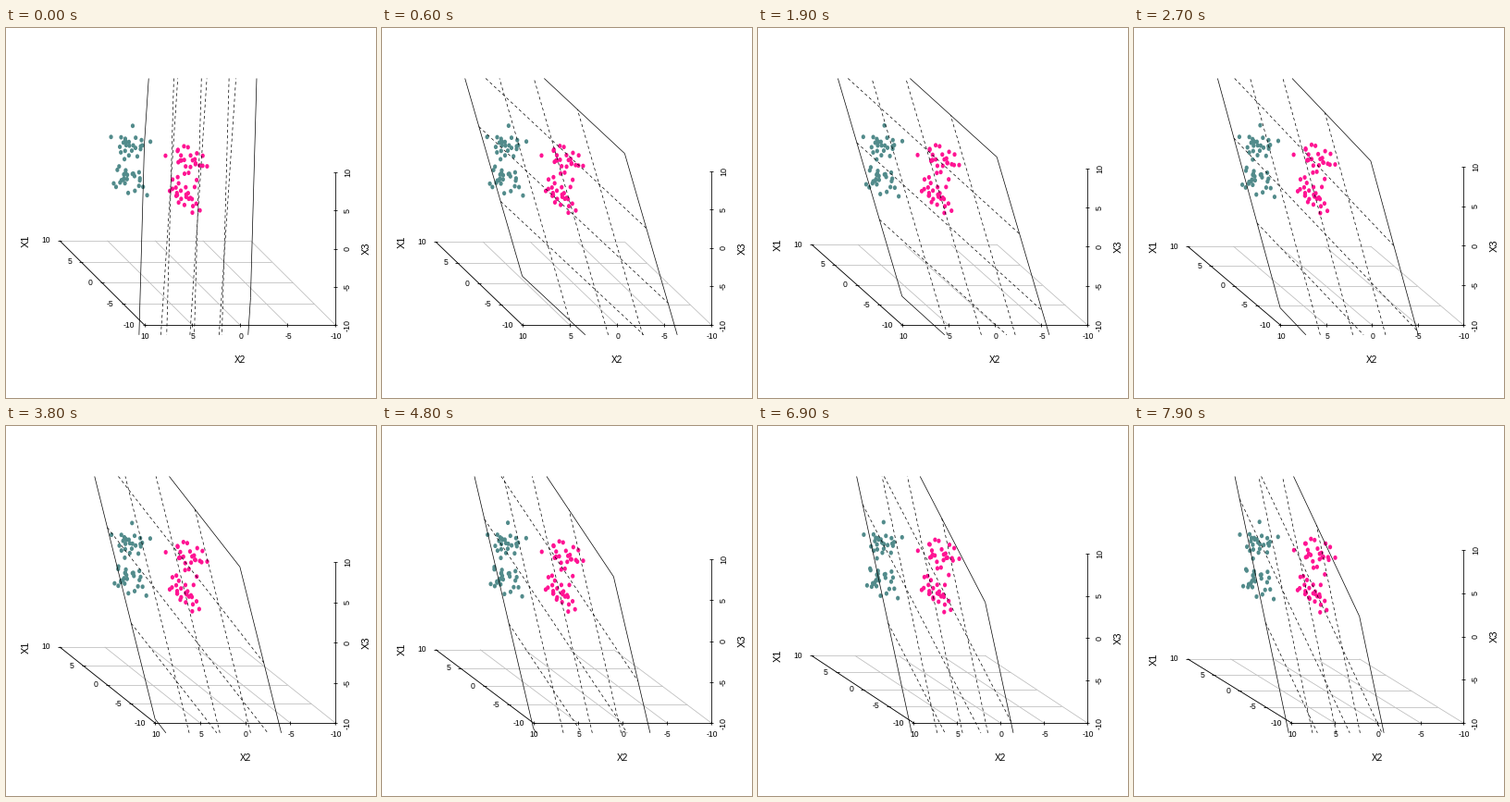
A matplotlib script that plays this animation: 400x400 px, repeating every 8 s.

```python
import numpy as np
import matplotlib.pyplot as plt
from matplotlib.animation import FuncAnimation
from matplotlib.collections import EllipseCollection, LineCollection

FRAMES, STEP = 80, 100
RIGHT, BASE = 356, 321
WIDTH, HEIGHT = 298, 256
DEPTH = 0.709
TOP, BOTTOM = 54.5, 331.8
TICKS = range(10, -11, -5)
INK = "black"


class View:
    """Oblique projection filling a fixed box while its angle turns."""

    def __init__(self, n):
        angle = np.radians(51.25 - 0.25 * n)
        kx, kz = DEPTH * np.cos(angle), DEPTH * np.sin(angle)
        self.ux = WIDTH / (1 + kx) / 20
        self.uz = HEIGHT / (1 + kz) / 20
        self.yx, self.yz = kx * self.ux, kz * self.uz

    def point(self, x, y, z=-10):
        return (RIGHT - (x + 10) * self.ux - (y + 10) * self.yx,
                BASE - (z + 10) * self.uz - (y + 10) * self.yz)


def plane(n):
    """Decision plane r*x + y + c = u*z, settling as it is trained."""
    u = 0.37 + 0.684 * np.exp(-n / 25.5) - 1.1026 * np.exp(-n / 3.5)
    far = 1.86 - 0.0493 * n - 1.01 * np.exp(-n / 8.6)
    near = -5.1 + 4.43 * np.exp(-n / 10.5)
    r, c = 1 - (far - near) / 20, (far + near) / 2
    return lambda x, y: (r * x + y + c) / u


def cut(p, q):
    """Clip a segment to the plot's vertical range."""
    (x0, y0), (x1, y1) = p, q
    if y0 == y1:
        return [p, q]
    ta, tb = sorted(((TOP - y0) / (y1 - y0), (BOTTOM - y0) / (y1 - y0)))
    ta, tb = max(ta, 0), min(tb, 1)
    if ta >= tb:
        return None
    return [(x0 + t * (x1 - x0), y0 + t * (y1 - y0)) for t in (ta, tb)]


fig = plt.figure(figsize=(4, 4), dpi=100, facecolor="white")
ax = fig.add_axes([0, 0, 1, 1])
ax.set(xlim=(0, 400), ylim=(400, 0))
ax.axis("off")
rng = np.random.default_rng(7)


def lines(color, width, z, style="solid"):
    return ax.add_collection(LineCollection(
        [], colors=color, linewidths=width * 0.72, linestyles=style, zorder=z))


def label(text, px, ha="center", rot=0):
    return ax.text(0, 0, text, fontsize=px * 0.72, family="Liberation Sans",
                   ha=ha, va="center", rotation=rot, color=INK)


def cloud(x, y, color, size=25):
    """Two unit-normal groups, one above the other."""
    spread = np.clip(rng.standard_normal((3, 2 * size)), -2, 2)
    z = np.repeat([5.5, 0.9], size)
    dots = EllipseCollection(
        [4.2] * len(z), [4.9] * len(z), [0] * len(z), units="xy",
        facecolors=color, edgecolors="none", zorder=3,
        offsets=np.zeros((len(z), 2)), offset_transform=ax.transData)
    ax.add_collection(dots)
    return dots, x + spread[0], y + spread[1], z + spread[2]


grid = lines("#bebebe", 0.8, 1)
axes = lines(INK, 0.8, 2)
edges = lines(INK, 0.7, 4)
inner = lines(INK, 0.7, 4, (0, (4.6, 4.2)))
clouds = [cloud(5.2, 5, "#528b8b"), cloud(0.8, 1.2, "#ff1493")]
x_nums = [label(str(t), 8.6) for t in TICKS]
y_nums = [label(str(t), 8.6, "right") for t in TICKS]
z_nums = [label(str(t), 9, rot=90) for t in TICKS]
x_name = label("X2", 10)
y_name, z_name = label("X1", 11, rot=90), label("X3", 11, rot=90)


def draw(n):
    view = View(n)
    at, height = view.point, plane(n)
    floor, solid, dashed = [], [], []
    for t in TICKS:
        for a, b in (((t, -10), (t, 10)), ((10, t), (-10, t))):
            floor.append([at(*a), at(*b)])
            seg = cut(at(*a, height(*a)), at(*b, height(*b)))
            if seg:
                (solid if abs(t) == 10 else dashed).append(seg)
    grid.set_segments(floor)
    edges.set_segments(solid)
    inner.set_segments(dashed)

    near, corner = at(10, -10), at(-10, -10)
    frame = [[near, corner], [near, at(10, 10)], [corner, at(-10, -10, 10)]]
    for t, xn, yn, zn in zip(TICKS, x_nums, y_nums, z_nums):
        px, py = at(t, -10)
        frame.append([(px, py - 2), (px, py + 2)])
        xn.set_position((px + 1, 333))
        px, py = at(10, t)
        frame.append([(px - 2, py), (px + 2, py)])
        yn.set_position((px - 10, py))
        px, py = at(-10, -10, t)
        frame.append([(px - 2, py), (px + 2, py)])
        zn.set_position((369.5, py))
    axes.set_segments(frame)

    x_name.set_position((at(0, -10)[0], 359))
    y_name.set_position((21.5, at(10, 10)[1]))
    z_name.set_position((389.5, at(-10, -10, 0)[1]))
    for dots, x, y, z in clouds:
        dots.set_offsets(np.column_stack(at(x, y, z)))
    return []


anim = FuncAnimation(fig, draw, frames=FRAMES, interval=STEP, repeat=True,
                     repeat_delay=0, init_func=lambda: draw(0))
plt.show()
```
